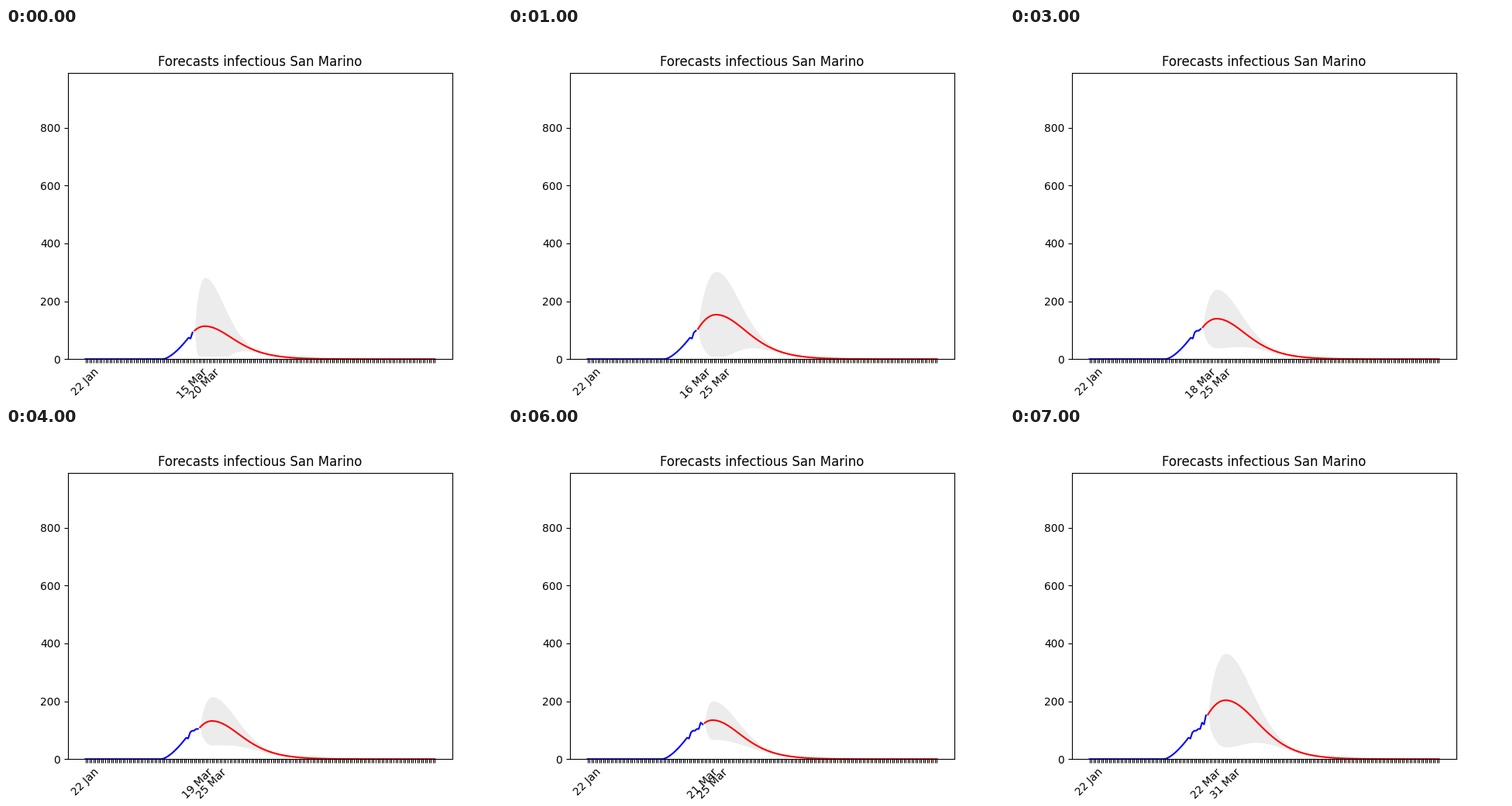
A matplotlib script that plays this animation: 640x480 px, repeating every 8 s.

```python
import numpy as np
import matplotlib.pyplot as plt
from matplotlib.animation import FuncAnimation

FIRST_DAY = 53   # days from 22 Jan to 15 Mar
HORIZON = 120    # days forecast ahead
DECAY = .12      # limiting daily rate of decline

# Active cases per day from 22 Jan: a smooth rise, then the latest counts
rise = 1.67 * np.clip(np.arange(52) - 38.5, 0, None) ** 1.5
cases = np.append(rise, [71, 92, 98, 98, 104, 104, 126, 120, 151])

# Per forecast: days until the peak, and the top of the uncertainty band
leads = [5, 9, 7, 7, 6, 7, 4, 9]
tops = [282, 303, 241, 241, 215, 265, 201, 365]

fig, ax = plt.subplots(figsize=(6.4, 4.8), dpi=100)


def march(day):
    return f"{day - 38} Mar"


def forecast(count, lead, top):
    """Mean, lower and upper curves for each day of the horizon."""
    days = np.arange(HORIZON)
    start = 12 + .94 * count
    peak = start + .61 * lead ** 2
    to_peak = np.clip(1 - days / lead, 0, 1)
    past = np.clip(days - lead, 0, None)

    # Parabola up to the peak, then a bend into exponential decline
    bend = 10 + .11 * peak
    fall = np.exp(-DECAY * (np.hypot(past, bend) - bend))
    mean = (peak - (peak - start) * to_peak ** 2) * fall

    half = top - peak
    spread = half * (1 - to_peak ** 2) ** .7 * fall ** (1 + half / peak)
    low = np.minimum(mean, np.maximum(mean - spread, 10))
    return mean, low, mean + spread


def draw(i):
    today = FIRST_DAY + i
    last = today + HORIZON
    lead = leads[i]
    mean, low, high = forecast(cases[today], lead, tops[i])
    ahead = np.arange(today + 1, last + 1)

    ax.clear()
    ax.fill_between(ahead, low, high, color="gray", alpha=.15, linewidth=0)
    ax.plot(cases[:today + 1], color="blue")
    ax.plot(ahead, mean, color="red")

    labels = [""] * (last + 1)
    labels[0] = "22 Jan"
    labels[today] = march(today)
    labels[today + lead + 1] = march(today + lead)
    ax.set_xticks(range(last + 1), labels, rotation=45)
    ax.set_xlim(-.05 * last, 1.05 * last)
    ax.set_ylim(0, 990)
    ax.set_yticks(range(0, 801, 200))
    ax.set_title("Forecasts infectious San Marino")
    return []


anim = FuncAnimation(fig, draw, frames=len(leads), interval=1000,
                     init_func=lambda: [], repeat=True, repeat_delay=0)
plt.show()
```
